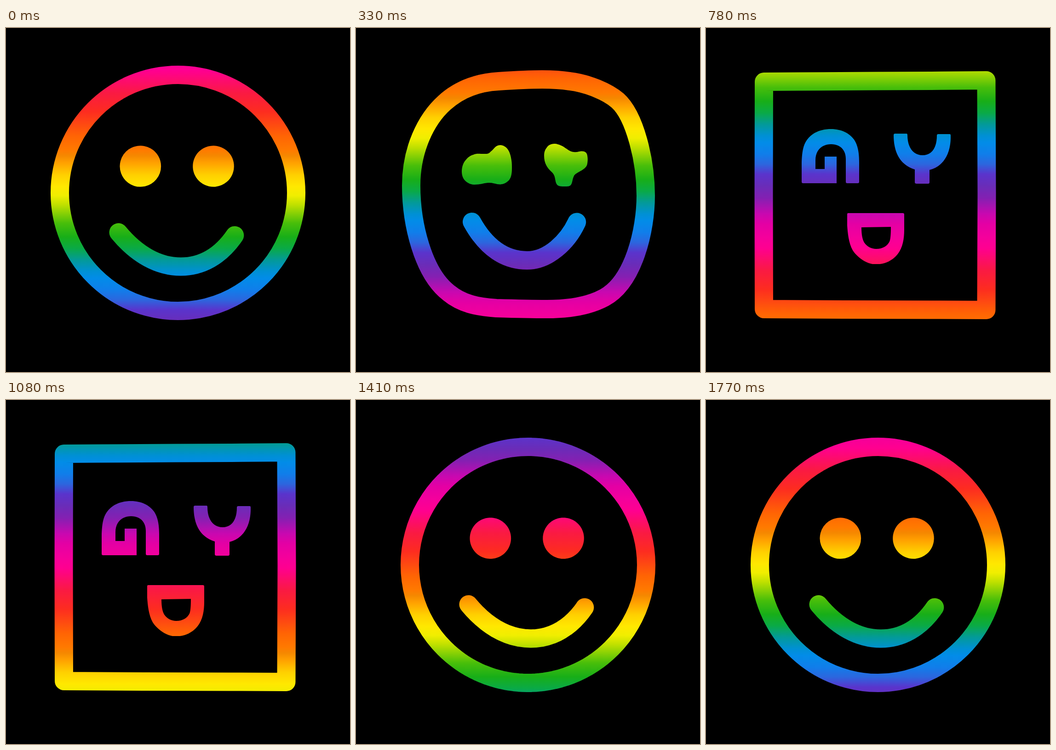
An HTML page for the animation above (1800 ms loop, 748 by 749 pixels).

```html
<!DOCTYPE html>
<html lang="en">
<head>
<meta charset="utf-8">
<title>Rainbow face</title>
<style>
html, body { margin: 0; width: 100%; height: 100%; overflow: hidden; background: #000; }
svg { display: block; width: 100%; height: 100%; }
</style>
</head>
<body>
<svg viewBox="0 0 748 749" preserveAspectRatio="none">
  <defs>
    <linearGradient id="rainbow" gradientUnits="userSpaceOnUse" x1="0" y1="93" x2="0" y2="775" spreadMethod="repeat"></linearGradient>
  </defs>
  <rect width="748" height="749" fill="#000"/>
  <path id="ring" fill="none" stroke="url(#rainbow)" stroke-width="40" stroke-linejoin="round"/>
  <path id="left" fill="url(#rainbow)"/>
  <path id="right" fill="url(#rainbow)"/>
  <path id="mouth" stroke-linecap="round" stroke-linejoin="round" fill-rule="evenodd"/>
</svg>
<script>
const NS = 'http://www.w3.org/2000/svg';
const PAINT = 'url(#rainbow)';
const LOOP = 1800, STEP = 30, BAND = 682, BAND_TOP = 93;
const OPEN_AT = 200, CLOSE_AT = 1095, MORPH = 330;
const SAMPLES = 12;
const byId = id => document.getElementById(id);
const lerp = (a, b, u) => a + (b - a) * u;
const ease = u => u < 0.5 ? 4 * u ** 3 : 1 - 4 * (1 - u) ** 3;
const clamp = u => Math.min(1, Math.max(0, u));

// Colour stops: height at the start of the loop, then colour.
const stops = `93 ff0090,142 fa1a42,182 fd2c20,235 ff6404,266 ff7a00,278 f58800,292 ff9e00,
320 ffd000,345 ffe800,365 f0ee00,385 bfe000,425 48be0a,455 18ae18,480 0aaa46,505 039a98,
530 0090d4,545 028ce8,570 107eea,592 2c66de,614 5a34cc,640 6a2cb8,666 8420b2,700 c808b0,
722 e400a4,750 f4009c,775 ff0090`;
const gradient = byId('rainbow');
for (const item of stops.split(',')) {
  const [y, hex] = item.trim().split(' ');
  const stop = document.createElementNS(NS, 'stop');
  stop.setAttribute('offset', (y - BAND_TOP) / BAND);
  stop.setAttribute('stop-color', '#' + hex);
  gradient.append(stop);
}

// A circle cut into clockwise arcs at the given angles.
function circle(cx, cy, r, angles) {
  const at = deg => {
    const a = deg * Math.PI / 180;
    return `${(cx + r * Math.cos(a)).toFixed(2)} ${(cy + r * Math.sin(a)).toFixed(2)}`;
  };
  return angles.slice(1).map((deg, i) =>
    (i ? '' : 'M' + at(angles[0])) + `A${r} ${r} 0 0 1 ${at(deg)}`).join('|');
}

// Each shape has four poses; "|" separates the pieces that correspond.
const KEYS = [0, ease(130 / MORPH), 0.5, 1];
const shapes = {
  ring: {
    closed: true,
    poses: [
      circle(374, 359, 257, [270, 290, 315, 360, 405, 440, 465, 495, 540, 585, 607, 630]),
      'M405 112C428 112 446 113 465 116|C505 121 547 139 569 158|C606 191 630 288 630 365|C630 440 604 552 540 587|C505 606 460 612 415 612|C378 612 340 611 305 610|C262 607 230 600 202 577|C145 533 120 425 120 343|C120 265 152 199 192 163|C228 130 272 118 310 116|C340 114 375 112 405 112',
      'M412 108C426 108 440 108 455 108|C500 110 551 121 575 151|C604 188 617 280 617 330|C617 405 608 500 595 535C585 566 567 582 540 592|C505 604 440 608 400 610|C355 613 335 615 300 615|C250 615 195 600 162 570|C132 540 124 445 124 385|C125 330 130 260 137 215C143 190 153 172 167 160|C200 128 265 117 325 112|C365 109 385 108 412 108',
      'M368 115.5L490 115|L609.5 114|L610.5 360|L609.5 614|L490 613.5|L300 613|L126 612|L125.5 360|L126 117|L200 116.5|L368 115.5'
    ]
  },
  left: {
    closed: true,
    poses: [
      circle(292.3, 301, 44.8, [125, 195, 215, 235, 250, 262, 280, 300, 360, 400, 435, 440, 485]),
      'M245 338C233 332 230 322 230 312C230 303 233 293 239 287|C243 282 248 278 255 276|C262 273 266 274 272 274|C277 274 281 274 285 274|C289 273 290 272 293 269|C297 266 299 263 302 260|C306 256 310 255 315 255|C330 257 336 272 338 288C339 294 339 300 339 306|C339 318 337 328 331 333|C322 341 314 341 307 340C302 339 297 337 290 337|L287 337|C276 338 270 341 258 341C253 341 249 340 245 338',
      'M222 341C210 336 207 322 207 302C207 285 210 268 221 263|C225 260 233 261 237 265|C241 271 241 284 248 285C254 286 256 283 259 281|C266 277 275 277 280 283|C286 290 290 298 298 297|C306 294 304 273 296 266C290 260 284 256 282 248|C281 239 286 232 296 231|C322 231 339 260 339 290|C339 310 336 328 328 335|C318 342 306 340 300 336C295 332 292 327 288 326|L285 326|C276 326 275 340 250 343C240 344 230 344 222 341',
      'M212 338Q208 338 208 335V290|L238 290|V307H258|V280H284|L304 285|C304 264 290 253 272 253C252 253 238 266 238 290|L208 290|C209 270 211 255 220 243C232 227 250 220 272 220C294 220 312 229 322 243C331 256 333 275 333 292|V335Q333 338 330 338|H307Q304 338 304 335V284|L284 281|V338H212'
    ],
    rest: 'M211 338Q208 338 208 335V292C209 270 211 255 220 243C232 227 250 220 272 220C294 220 312 229 322 243C331 256 333 275 333 292V335Q333 338 330 338H307Q304 338 304 335V285C304 264 290 253 272 253C252 253 238 266 238 288V307H258V280H284V338Z'
  },
  right: {
    closed: true,
    poses: [
      circle(451, 301, 44.8, [225, 255, 280, 310, 355, 410, 445, 475, 490, 585]),
      'M415 260C419 254 425 252 432 252C437 252 441 254 444 255|C452 258 457 263 464 267|C471 271 478 271 485 269|C494 267 502 269 503 278C504 284 504 288 503 295|C502 309 479 313 474 322|C470 330 471 337 467 342C464 345 460 345 454 345|C447 345 440 345 437 341C434 337 434 333 433 329|C432 322 430 318 426 314|C415 304 409 294 409 278C409 270 411 265 415 260',
      'M409 248C413 241 420 242 427 244C430 245 432 247 434 249|C443 257 448 272 468 272|C480 272 485 263 491 259|C499 252 516 254 522 264C524 268 525 272 523 276|C516 294 487 304 483 320|C481 328 485 335 481 340C479 342 476 343 470 343|C460 343 452 343 447 340C443 336 442 332 441 328|C440 321 440 315 434 308|C422 296 403 281 406 257C406 253 407 250 409 248',
      'M411 230H436Q438 230 438 233|C438 262 452 277 471 277|C490 277 502 262 502 234|Q502 231 505 231H530Q532 231 532 234|C533 275 515 302 486 309|V336Q486 339 483 339|H458Q454 339 454 336|V308|C425 299 408 275 408 233Q408 230 411 230'
    ]
  },
  mouth: {
    poses: [
      'M244.5 445L245 445.6|C285 494 332 519.5 380 519.5|C425 519.5 466 497 497 452|L497.3 451.5',
      'M252 422L252.3 422.5|C284 480 325 506 372 506|C418 506 460 466 480 423|L480.2 422.5',
      'M289 415L289.1 415.5|C300 466 333 501 372 501|C412 501 446 466 456 414|L456.1 413.5',
      'M369 418.5L322.5 418.5|V435C323 475 345 497.5 370 497.5|C395 497.5 415.5 475 415.5 435V418.5|L369 418.5'
    ],
    rest: 'M309 403H428Q431 403 431 406V440C431 458 428 478 417 492C408 504 392 513 378 514H362C345 511 328 498 319 484C310 468 308 445 307 430V406Q307 403 309 403ZM338 434C338 450 340 460 344 467C350 476 360 481 370 481C384 481 394 475 399 465C401 460 402 450 402 433Z'
  }
};

// Evenly spaced points along every piece of a pose.
const ruler = document.createElementNS(NS, 'path');
function sample(pose) {
  const pieces = pose.split('|');
  const ends = pieces.map((_, i) => {
    ruler.setAttribute('d', pieces.slice(0, i + 1).join(''));
    return ruler.getTotalLength();
  });
  const points = [];
  ends.forEach((end, i) => {
    const from = i ? ends[i - 1] : 0;
    for (let k = i ? 1 : 0; k <= SAMPLES; k++) {
      const p = ruler.getPointAtLength(lerp(from, end, k / SAMPLES));
      points.push([p.x, p.y]);
    }
  });
  return points;
}

for (const [id, shape] of Object.entries(shapes)) {
  shape.node = byId(id);
  shape.points = shape.poses.map(sample);
  shape.tail = shape.closed ? 'Z' : '';
}

function outline(shape, p) {
  const exact = KEYS.indexOf(p);
  if (p === 1 && shape.rest) return shape.rest;
  if (exact >= 0) return shape.poses[exact].replaceAll('|', '') + shape.tail;
  const i = KEYS.findIndex(key => key > p) - 1;
  const u = (p - KEYS[i]) / (KEYS[i + 1] - KEYS[i]);
  const [a, b] = [shape.points[i], shape.points[i + 1]];
  return 'M' + a.map(([x, y], k) =>
    `${lerp(x, b[k][0], u).toFixed(2)} ${lerp(y, b[k][1], u).toFixed(2)}`).join('L') + shape.tail;
}

let shown = -1;
function draw(t) {
  gradient.setAttribute('gradientTransform', `translate(0 ${-BAND * t / LOOP})`);
  const p = ease(clamp((t - OPEN_AT) / MORPH)) - ease(clamp((t - CLOSE_AT) / MORPH));
  if (p === shown) return;
  shown = p;
  for (const shape of Object.values(shapes)) shape.node.setAttribute('d', outline(shape, p));
  const mouth = shapes.mouth.node;
  const solid = p === 1;
  mouth.setAttribute('fill', solid ? PAINT : 'none');
  mouth.setAttribute('stroke', solid ? 'none' : PAINT);
  mouth.setAttribute('stroke-width', lerp(40, 31.5, clamp(p * 2 - 1)));
}

const start = performance.now();
function tick() {
  const t = (performance.now() - start) % LOOP;
  draw(Math.floor(t / STEP) * STEP);
  requestAnimationFrame(tick);
}
tick();
</script>
</body>
</html>
```
